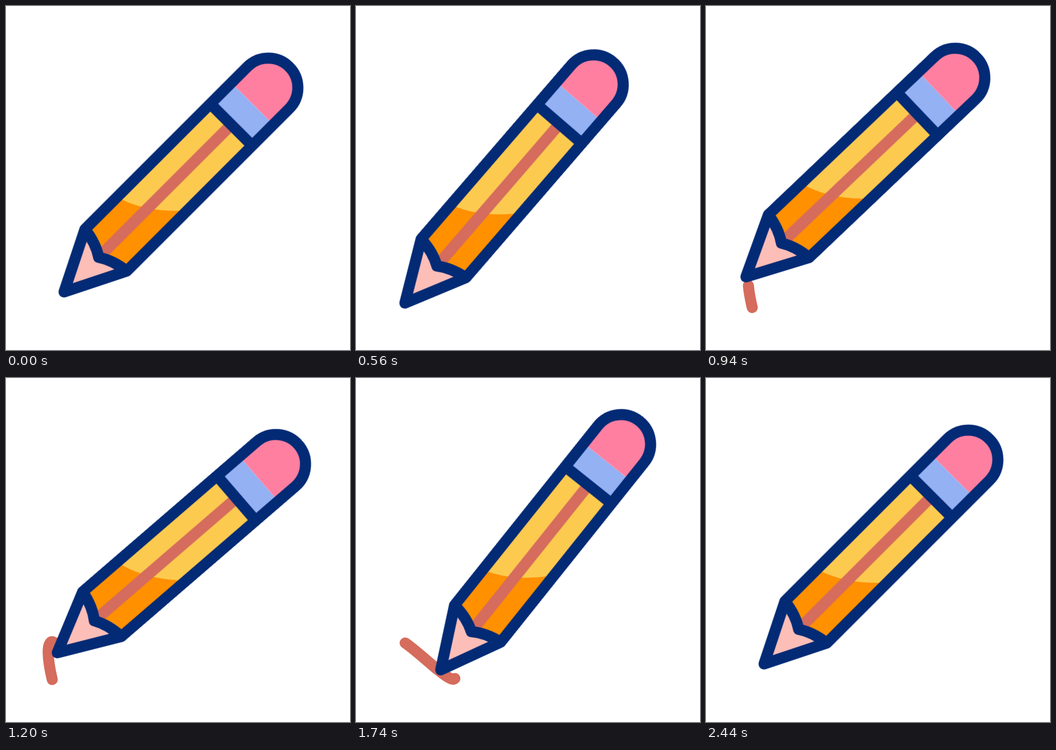
Animation, 640 px wide and 640 px high, one loop 3.6 s. Source, as an HTML page:

```html
<!DOCTYPE html>
<html lang="en">
<head>
<meta charset="utf-8">
<title>Pencil</title>
<style>
  html, body { margin: 0; width: 100%; height: 100%; overflow: hidden; background: #fff; }
  svg { display: block; width: 100vw; height: 100vh; }
  .line { fill: none; stroke-width: 20.6px; stroke-linecap: round; stroke-linejoin: round; }
  .ink { stroke: #032a75; }
  .lead { stroke: #d56c5d; }

  /* Each channel eases between its turning points */
  .x, .y, .tilt, .trail { animation: 3600ms infinite ease-in-out; }
  .x { animation-name: x; }
  .y { animation-name: y; }
  .tilt { animation-name: tilt; }
  .trail { animation-name: trail, show; animation-timing-function: linear, step-end; }

  @keyframes x {
    0% { transform: translateX(108px); animation-timing-function: cubic-bezier(.5, 0, .75, 1); }
    26.11% { transform: translateX(74.3px); animation-timing-function: cubic-bezier(.64, 0, .82, 1); }
    42.5% { transform: translateX(183px); animation-timing-function: cubic-bezier(.23, 0, .26, 1); }
    67.78%, 100% { transform: translateX(108px); }
  }
  @keyframes y {
    0% { transform: translateY(532px); }
    15.56% { transform: translateY(552.7px); animation-timing-function: cubic-bezier(.5, 0, .5, 1); }
    29.72% { transform: translateY(498px); animation-timing-function: cubic-bezier(.4, 0, .42, 1); }
    42.5% { transform: translateY(558px); animation-timing-function: cubic-bezier(.25, 0, .26, 1); }
    58.89%, 100% { transform: translateY(532px); }
  }
  @keyframes tilt {
    0% { transform: rotate(-45deg); }
    15.56% { transform: rotate(-49.2deg); animation-timing-function: cubic-bezier(.7, 0, .72, 1); }
    30.28% { transform: rotate(-40.2deg); animation-timing-function: cubic-bezier(.8, 0, .46, 1); }
    42.5% { transform: rotate(-53.7deg); animation-timing-function: cubic-bezier(.23, 0, .4, 1); }
    67.78%, 100% { transform: rotate(-45deg); }
  }
  /* The dash grows to full length, then slides off the far end */
  @keyframes trail {
    0%, 16.67% { stroke-dasharray: 0px 2px; stroke-dashoffset: 0px; animation-timing-function: cubic-bezier(.45, .2, .8, .55); }
    42.5%, 43.06% { stroke-dasharray: 1px 2px; stroke-dashoffset: 0px; animation-timing-function: cubic-bezier(.33, .67, .67, 1); }
    66.11%, 100% { stroke-dasharray: 1px 2px; stroke-dashoffset: -1px; }
  }
  @keyframes show {
    0%, 66.11%, 100% { opacity: 0; }
    16.67% { opacity: 1; }
  }
</style>
</head>
<body>
<svg viewBox="0 0 640 640">
  <path class="line lead trail" pathLength="1"
    d="M86 561C82 544 79 528 78.5 513C78 497 82 490 86 490.5C93 491 125 520 150 541C165 553 176 561 181 560.5Q183 560 184 559"/>
  <!-- Tip at the origin, axis along x -->
  <g class="x"><g class="y"><g class="tilt">
    <path fill="#fdbeb8" d="M0 0L110 -55Q106 -22 91 0Q106 22 110 55Z"/>
    <path fill="#fdca50" d="M110 -55H440V55H110Q106 22 91 0Q106 -22 110 -55Z"/>
    <path fill="#ff9000" d="M110 -55H191L198 -44Q214.5 2 257 43.5L266 55H110Q106 22 91 0Q106 -22 110 -55Z"/>
    <path fill="#d56c5d" d="M91 -10.5H440V10.5H91Z"/>
    <path fill="#94b1f4" d="M440 -55H495.4V55H440Z"/>
    <path fill="#ff7fa0" d="M495.4 -55H537.4A55 55 0 0 1 537.4 55H495.4Z"/>
    <path class="line ink" d="M0 0L110 -55H537.4A55 55 0 0 1 537.4 55H110ZM110 -55Q106 -22 91 0Q106 22 110 55M440 -55V55"/>
  </g></g></g>
</svg>
</body>
</html>
```
